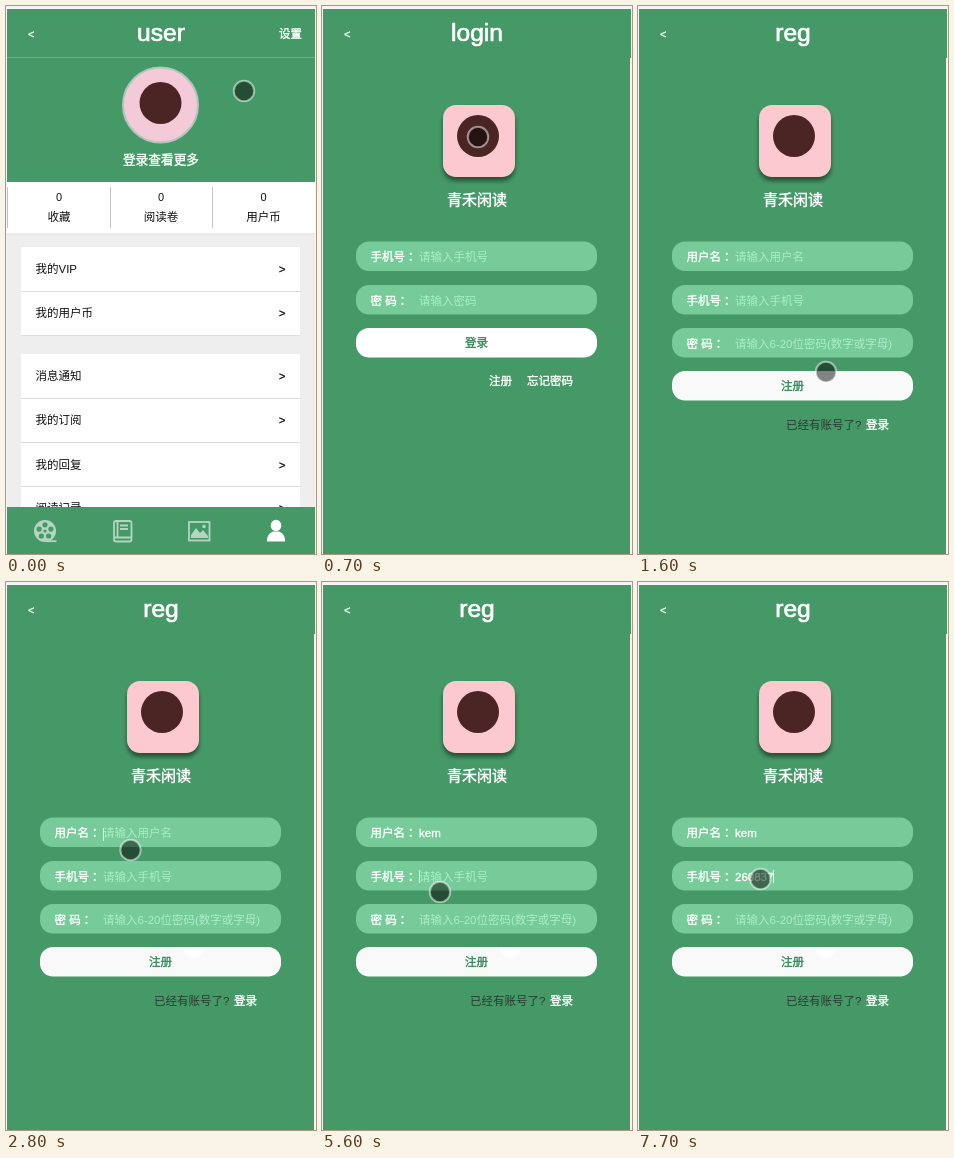
Animation of 310 by 548 pixels, one loop 8000 ms. Source, as an HTML page:

```html
<!DOCTYPE html>
<html lang="zh-CN">
<head>
<meta charset="utf-8">
<style>
html, body { margin: 0; width: 310px; height: 548px; overflow: hidden; background: #f4f5f4; }
svg { display: block; font-family: "Liberation Sans", "Noto Sans CJK SC", "Noto Sans CJK", sans-serif; }
text { white-space: pre; stroke-width: .03em; }
text[fill="#fff"] { stroke: #fff; }
text[fill="#2f8a57"] { stroke: #2f8a57; }
.colon { font-family: "Noto Sans CJK TC", "Noto Sans CJK", sans-serif; }
</style>
</head>
<body>
<svg id="stage" width="310" height="548" viewBox="0 0 310 548"></svg>
<script>
const LOOP = 8000, GREEN = '#459967', FIELD = '#76cb99', HINT = '#a9efc6', ICON = '#b5d5c2';
const INK = '#111', BUTTON_INK = '#2f8a57', HAIR = '#4b2523';
const APP = '青禾闲读', NAME = 'kem', PHONE = '260837', TEXT_X = 97;

// y is the vertical centre of the glyphs
const text = (x, y, s, fill = '#fff', size = 11.5, extra = '') =>
  `<text x="${x}" y="${y + size * .36}" fill="${fill}" font-size="${size}" ${extra}>${s}</text>`;
const mid = (x, y, s, fill, size) => text(x, y, s, fill, size, 'text-anchor="middle"');
const rect = (x, y, w, h, fill, r = 0) =>
  `<rect x="${x}" y="${y}" width="${w}" height="${h}" rx="${r}" fill="${fill}"/>`;
const circle = (x, y, r, fill, extra = '') => `<circle cx="${x}" cy="${y}" r="${r}" fill="${fill}" ${extra}/>`;
const title = s => mid(155, 26.5, s, '#fff', 24.6) + text(22, 28, '&lt;', '#fff', 11);

const row = (y, s) => text(29.5, y, s, INK) + text(273, y, '&gt;', INK, 11, `stroke="${INK}"`);
const stat = (x, s) => mid(x, 191, '0', INK, 11) + mid(x, 211, s, INK);

function reel() {
  let holes = circle(39, 525, 1.6, GREEN);
  for (let i = 0; i < 5; i++) {
    const a = (i * 72 - 90) * Math.PI / 180;
    holes += circle(39 + 6.2 * Math.cos(a), 525 + 6.2 * Math.sin(a), 2.6, GREEN);
  }
  return circle(39, 525, 11, ICON) + holes +
    `<path d="M40 535.2h10.5" stroke="${ICON}" stroke-width="1.8"/>`;
}

const tabs = rect(1, 501, 308, 47, GREEN) + reel() +
  `<g fill="none" stroke="${ICON}" stroke-width="1.8">
    <rect x="108" y="515" width="17.5" height="20.5" rx="2"/>
    <path d="M108 531.5h17.5M111.5 515v16M114 519.5h8M114 523h8"/>
    <rect x="183" y="516" width="20.5" height="18.5"/>
  </g>
  <path d="M185 532v-3l5-7 4 5 3-3 5 6v2z" fill="${ICON}"/>` + circle(198, 520.5, 1.8, ICON) +
  `<ellipse cx="270" cy="519.5" rx="5.3" ry="5.8" fill="#fff"/>
  <path d="M261 535.5c0-6 2-8 6-10h6c4 2 6 4 6 10z" fill="#fff"/>`;

const userPage = rect(1, 3, 308, 173, GREEN) + title('user') + text(273, 28, '设置') +
  rect(1, 51, 308, 1, '#69b088') +
  circle(154.5, 99, 37.5, '#f5cad8', 'stroke="#b3c6bd" stroke-width="2"') +
  circle(154.5, 97, 21, HAIR) +
  mid(155, 153, '登录查看更多', '#fff', 12.7) +
  rect(1, 176, 308, 52, '#fff') + rect(1, 227.5, 308, 1, '#d5d5d5') +
  [1, 104, 206].map(x => rect(x, 181, 1, 41, '#c4c4c4')).join('') +
  stat(53, '收藏') + stat(155, '阅读卷') + stat(257.5, '用户币') +
  rect(1, 228.5, 308, 274, '#eee') +
  rect(15, 241, 279, 89, '#fff') + rect(15, 348, 279, 154, '#fff') +
  [285, 329, 392, 436, 480].map(y => rect(15, y, 279, 1, '#ddd')).join('') +
  row(263, '我的VIP') + row(307, '我的用户币') + row(370, '消息通知') +
  row(414, '我的订阅') + row(459, '我的回复') + row(502, '阅读记录') + tabs;

const bar = (y, fill) => rect(34, y, 241, 29.5, fill, 13);
const button = (y, fill, s) => bar(y, fill) + mid(154.5, y + 14.5, s, BUTTON_INK);
const field = (y, label, hint, id) => bar(y, FIELD) +
  text(48.5, y + 15.5, label + '<tspan class="colon" lang="zh-TW">：</tspan>') +
  text(TEXT_X, y + 15.5, hint, HINT, 11.5, `id="${id}"`);
const frame = name => rect(1, 3, 308, 545, GREEN) + rect(308, 52, 1, 496, '#f4f5f4') + title(name) +
  `<rect x="121" y="99" width="72" height="72" rx="13" fill="#fdc9d0" style="filter:drop-shadow(0 4px 2px #0007)"/>` +
  circle(156, 130, 21, HAIR) + mid(155, 193.5, APP, '#fff', 15);

const loginPage = frame('login') +
  field(235.5, '手机号', '请输入手机号', 'loginPhone') + field(279, '密 码', '请输入密码', 'loginPass') +
  button(322, '#fff', '登录') + text(167, 375, '注册') + text(205, 375, '忘记密码');

const regPage = frame('reg') +
  field(235.5, '用户名', '请输入用户名', 'nameText') +
  field(279, '手机号', '请输入手机号', 'phoneText') +
  field(322, '密 码', '请输入6-20位密码(数字或字母)', 'passText') +
  button(365, '#f9f9f9', '注册') + '<path d="M178 366h20a10 10 0 0 1-20 0z" fill="#fff"/>' +
  text(148, 419, '已经有账号了?', '#283c31') + text(228, 419, '登录') +
  '<rect id="caret" width="1" height="13" fill="#fff"/>';

const $ = id => document.getElementById(id);
$('stage').innerHTML = `<g id="user">${userPage}</g><g id="login">${loginPage}</g><g id="reg">${regPage}</g>` +
  circle(0, 0, 10.2, '#0000007c', 'id="pointer" stroke="#ffffff80" stroke-width="2"');

// pointer path: time, x, y
const path = [
  [0, 238, 85], [200, 200, 92], [400, 165, 97], [600, 155, 98], [700, 156, 131], [900, 167, 356],
  [1100, 182, 370], [1200, 189, 371], [1300, 188, 366], [1600, 188, 366], [1800, 180, 321],
  [1900, 180, 321], [2200, 138, 279], [2400, 124.5, 268], [2800, 124.5, 268], [3000, 126, 262],
  [3200, 124, 254], [5299, 124, 254], [5300, 118, 310], [5799, 118, 310], [5800, 122.5, 297], [LOOP, 122.5, 297]
];
const nameKeys = [3700, 4000, 4600], phoneKeys = [6400, 6700, 6900, 7100, 7300, 7700];
const caretFlips = [2800, 3200, 3700, 4500, 4600, 5100, 5500, 6100, 6400];
const count = (times, t) => times.filter(k => k <= t).length;

function pointerAt(t) {
  const i = path.findIndex(p => p[0] > t), [t0, x0, y0] = path[i - 1], [t1, x1, y1] = path[i];
  const k = (t - t0) / (t1 - t0);
  return [x0 + (x1 - x0) * k, y0 + (y1 - y0) * k];
}

// shows the typed part or the hint, returns the caret x
function type(el, value, hint, n) {
  el.textContent = n ? value.slice(0, n) : hint;
  el.setAttribute('fill', n ? '#fff' : HINT);
  return TEXT_X + (n ? el.getComputedTextLength() : 0);
}

function draw(now) {
  const t = Math.floor(now % LOOP / 100) * 100;
  const page = t < 700 ? 'user' : t < 1600 ? 'login' : 'reg';
  for (const id of ['user', 'login', 'reg']) $(id).style.display = id === page ? '' : 'none';

  if (page === 'reg') {
    const nameEnd = type($('nameText'), NAME, '请输入用户名', count(nameKeys, t));
    const phoneEnd = type($('phoneText'), PHONE, '请输入手机号', count(phoneKeys, t));
    const onPhone = t >= 5600, caret = $('caret');
    caret.setAttribute('x', Math.floor(onPhone ? phoneEnd : nameEnd));
    caret.setAttribute('y', onPhone ? 288 : 246);
    caret.style.display = count(caretFlips, t) % 2 ? '' : 'none';
  }
  $('pointer').setAttribute('transform', `translate(${pointerAt(t)})`);
  requestAnimationFrame(draw);
}
requestAnimationFrame(draw);
</script>
</body>
</html>
```
